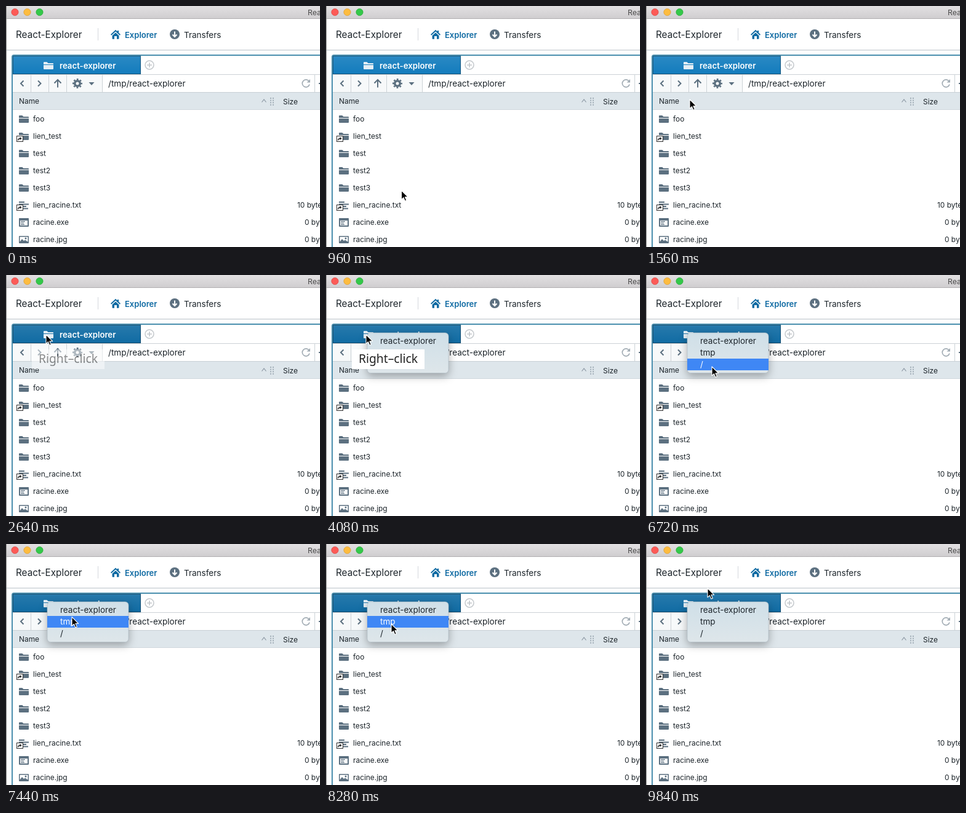
An HTML page that plays this animation: 510 by 392 pixels, repeating every 9.96 s.

```html
<!DOCTYPE html>
<html lang="en">
<head>
<meta charset="utf-8">
<title>File explorer</title>
<style>
  html, body { margin: 0; width: 100%; height: 100%; overflow: hidden; background: #fff; }
  svg { display: block; font-family: Inter, Roboto, sans-serif; }
  text { white-space: pre; }
  .menu { filter: drop-shadow(0 5px 7px rgba(0, 0, 0, .3)); }
</style>
</head>
<body>
<svg id="stage" width="510" height="392" viewBox="0 0 510 392"></svg>
<script>
const LOOP = 9960, STEP = 120;
const SLATE = '#5c7080', INK = '#1c242a', BLUE = '#106ba3';

const rect = (x, y, w, h, fill, extra = '') =>
  `<rect x="${x}" y="${y}" width="${w}" height="${h}" fill="${fill}" ${extra}/>`;
const label = (x, y, size, str, fill = INK, extra = '') =>
  `<text x="${x}" y="${y}" font-size="${size}" fill="${fill}" ${extra}>${str}</text>`;
const fill = (d, color = SLATE) => `<path d="${d}" fill="${color}" fill-rule="evenodd"/>`;
const stroke = (d, color = SLATE, w = 2, extra = '') =>
  `<path d="${d}" fill="none" stroke="${color}" stroke-width="${w}" ${extra}/>`;
const at = (x, y, body) => `<g transform="translate(${x} ${y})">${body}</g>`;

// Icons on a 16 px grid
const folder = color => fill('M0 7h16v6a1 1 0 0 1-1 1H1a1 1 0 0 1-1-1zM15 4H7.4L5.7 2.3A1 1 0 0 0 5 2H1a1 1 0 0 0-1 1v3h16V5a1 1 0 0 0-1-1z', color);
const lines = fill('M0 2h9v2H0zM0 5.5h16v2H0zM0 9h12v2H0zM0 12.5h15v2H0z');
const app = fill('M1 1h14a1 1 0 0 1 1 1v12a1 1 0 0 1-1 1H1a1 1 0 0 1-1-1V2a1 1 0 0 1 1-1zM2 5v8h12V5zM3 6h7v1.2H3zM3 8.4h5v1.2H3zM3 10.8h6v1.2H3z');
const photo = fill('M1 2h14a1 1 0 0 1 1 1v10a1 1 0 0 1-1 1H1a1 1 0 0 1-1-1V3a1 1 0 0 1 1-1zM1.5 3.5v8L5 7l3 3 2-1.5 4.5 3v-8zM11 4.5a1.5 1.5 0 1 1 0 3 1.5 1.5 0 0 1 0-3z');
const linkBadge = at(-4, 7, rect(.5, .5, 10, 9, '#fff', 'stroke="#333"') +
  stroke('M2.5 7.5Q3 4.5 6 4.5', '#222', 1.4) + fill('M5.5 2l3.2 2.5L5.5 7z', '#222'));
const cog = `<circle cx="8" cy="8" r="4.3" fill="none" stroke="${SLATE}" stroke-width="3.6"/>
  <circle cx="8" cy="8" r="6.9" fill="none" stroke="${SLATE}" stroke-width="2.2" stroke-dasharray="2.7 2.719" stroke-dashoffset="1.35"/>`;

const rows = [
  ['foo', folder()], ['lien_test', folder() + linkBadge], ['test', folder()],
  ['test2', folder()], ['test3', folder()],
  ['lien_racine.txt', lines + linkBadge, '10 bytes', 473],
  ['racine.exe', app, '0 bytes', 485], ['racine.jpg', photo, '0 bytes', 485]
];

const titleBar = rect(0, 0, 510, 20, 'url(#bar)') + rect(0, 20, 510, 1, '#b1afb1') +
  [['#fc5b57', '#df4744', 14.5], ['#fdbc40', '#de9f34', 34.5], ['#34c84a', '#27aa35', 54.5]]
    .map(([c, edge, x]) => `<circle cx="${x}" cy="10" r="5.6" fill="${c}" stroke="${edge}" stroke-width=".8"/>`).join('') +
  label(490, 14.5, 12.3, 'React-Explorer', '#4a4a4a');

const header = rect(0, 71, 510, 1, '#c9cfd4') + rect(0, 72, 510, 1, '#ebeef0') +
  label(16, 52, 15.25, 'React-Explorer') + rect(149, 36, 1, 20, '#d5d9dd') +
  at(170, 38, fill('M8 .8l2.8 2.6V2H13v3.5l3 2.8-1.2 1.4L8 3.5 1.2 9.7 0 8.3zM8 5.2l5.5 5V15a.8.8 0 0 1-.8.8H10V11H6v4.800H3.300a.8.8 0 0 1-.8-.8v-4.800z', BLUE)) +
  label(193, 52, 13, 'Explorer', BLUE, 'font-weight="600"') +
  `<circle cx="274" cy="46" r="8" fill="${SLATE}"/>` +
  stroke('M274 41.500v8M270.500 46.500l3.500 3.500 3.500-3.500', '#fff') +
  label(289, 52, 13.5, 'Transfers');

const panel = `<rect x="10" y="80" width="540" height="340" rx="3" fill="#fff" stroke="#4b8fae" stroke-width="2"/>` +
  rect(11, 81, 208, 30, '#137cbd', 'id="tab"') + rect(11, 81, 208, 30, 'url(#sheen)') +
  rect(11.5, 81.5, 207, 29, 'none', 'stroke="#10161a" stroke-opacity=".4"') +
  at(61, 89, folder('#e4eef5')) + label(87, 102, 13.2, 'react-explorer', '#fff', 'font-weight="600"') +
  `<circle cx="233" cy="96" r="7" fill="none" stroke="#c3c8cc" stroke-width="1.5"/>` +
  stroke('M229 96h8M233 92v8', '#c3c8cc', 1.6);

const toolbar = rect(11, 111, 146, 30, '#f7f9fa') + rect(11, 111, 499, 1, '#ccd2d6') +
  [40, 69, 98, 156, 501].map(x => rect(x, 111, 1, 30, '#ccd2d6')).join('') +
  stroke('M28.500 121.500l-4.500 4.500 4.500 4.500M52 121.500l4.500 4.500-4.500 4.500M84 132.500v-12M78.500 125.500l5.500-5.500 5.500 5.500') +
  at(108, 118, cog) + fill('M134.500 124h9l-4.500 5z') +
  label(166, 131, 13.55, '/tmp/react-explorer') +
  stroke('M492.500 123a6 6 0 1 0 .5 4.500', '#a3adb5', 1.7) + fill('M494 119v5.500h-5.500z', '#a3adb5') +
  rect(508, 125, 2, 2, SLATE);

const table = rect(11, 140, 499, 29, '#dee6eb') + rect(11, 140, 499, 1, '#c8d0d5') + rect(11, 168, 499, 1, '#d0d8dd') +
  label(21, 159, 11.9, 'Name') + label(450, 159.500, 11.9, 'Size') +
  stroke('M415.500 156.500l3.500-4.500 3.500 4.500', '#8c99a3', 1.2) +
  [0, 1, 2, 3].map(i => rect(429, 149 + i * 3.6, 2, 2, '#a3afb8') + rect(433, 149 + i * 3.6, 2, 2, '#a3afb8')).join('') +
  rows.map(([name, icon, size, x], i) => at(0, 184 + 28 * i,
    at(21, -8, icon) + label(44, 4.300, 11.9, name) + (size ? label(x, 4.300, 11.9, size) : ''))).join('');

const menuItems = ['react-explorer', 'tmp', '/'];
const menu = `<g id="menu"><g class="menu">${rect(67, 94, 132, 65.500, 'url(#glass)', 'rx="5.5" stroke="#a9b7c0" stroke-width=".6"')}</g>` +
  rect(67, 98, 132, 19, '#3f87f5', 'id="mark"') +
  menuItems.map((s, i) => label(88, 112 + 19.2 * i, 13.5, s, INK, 'class="item"')).join('') + '</g>';

const note = `<g id="note">${rect(42, 121, 118, 32, '#fff')}` +
  `<text x="53" y="143" font-size="19.3" fill="#222" font-weight="500" style="font-family:'Noto Sans','Open Sans',sans-serif">Right–click</text></g>`;

const cursor = `<path id="cursor" d="M0 0V14.800L3.400 11.600 5.900 17.200 8.300 16.200 5.900 10.700H10.600Z" fill="#000" stroke="#fff" stroke-width="1.1" stroke-linejoin="round"/>`;

const gradient = (id, a, b, oa = 1, ob = 1) => `<linearGradient id="${id}" x2="0" y2="1">
  <stop stop-color="${a}" stop-opacity="${oa}"/><stop offset="1" stop-color="${b}" stop-opacity="${ob}"/></linearGradient>`;

const $ = id => document.getElementById(id);
$('stage').innerHTML = `<defs>${gradient('bar', '#e2e0e2', '#d0ced0')}${gradient('sheen', '#fff', '#fff', .1, 0)}${gradient('glass', '#cfdfe8', '#dee6ea')}</defs>` +
  rect(0, 0, 510, 392, '#fff') + titleBar + header + panel + toolbar + table +
  rect(0, 0, 1, 392, '#8a8a8a') + menu + note + cursor;

// Pointer path: time, x, y
const path = [
  [720, 165, 400], [1200, 80, 200], [1320, 80, 200], [1560, 71, 152], [2160, 66, 101], [2520, 65, 97],
  [4560, 65, 97], [5160, 104, 116], [5520, 110, 124], [6000, 111, 107], [6720, 107, 149],
  [7260, 107, 107], [7800, 107, 152], [8280, 106, 130], [8760, 105, 129], [9480, 100, 72], [LOOP, 100, 72]
];
const clamp = v => Math.max(0, Math.min(1, v));

function pointer(t) {
  const i = Math.max(1, path.findIndex(p => p[0] >= t));
  const [t0, x0, y0] = path[i - 1], [t1, x1, y1] = path[i];
  const u = clamp((t - t0) / (t1 - t0)), k = u * u * (3 - 2 * u);
  return [x0 + (x1 - x0) * k, y0 + (y1 - y0) * k];
}

function draw(now) {
  const t = Math.floor(now % LOOP / STEP) * STEP;
  const [x, y] = pointer(t), open = t >= 4080;
  $('cursor').setAttribute('transform', `translate(${x} ${y})`);
  $('cursor').style.display = t >= 840 ? '' : 'none';
  $('tab').setAttribute('fill', open || (t >= 840 && y < 111) ? BLUE : '#137cbd');
  $('menu').style.display = open ? '' : 'none';
  $('note').style.opacity = Math.min(clamp((t - 2400) / 480), clamp((4920 - t) / 480));

  const row = x >= 67 ? Math.floor((y - 98) / 19) : -1;
  const active = row >= 0 && row < menuItems.length;
  $('mark').style.display = active ? '' : 'none';
  $('mark').setAttribute('y', 98 + 19 * row);
  document.querySelectorAll('.item').forEach((el, i) => el.setAttribute('fill', i === row ? '#fff' : INK));
}

const start = performance.now();
(function tick() {
  draw(performance.now() - start);
  requestAnimationFrame(tick);
})();
</script>
</body>
</html>
```
